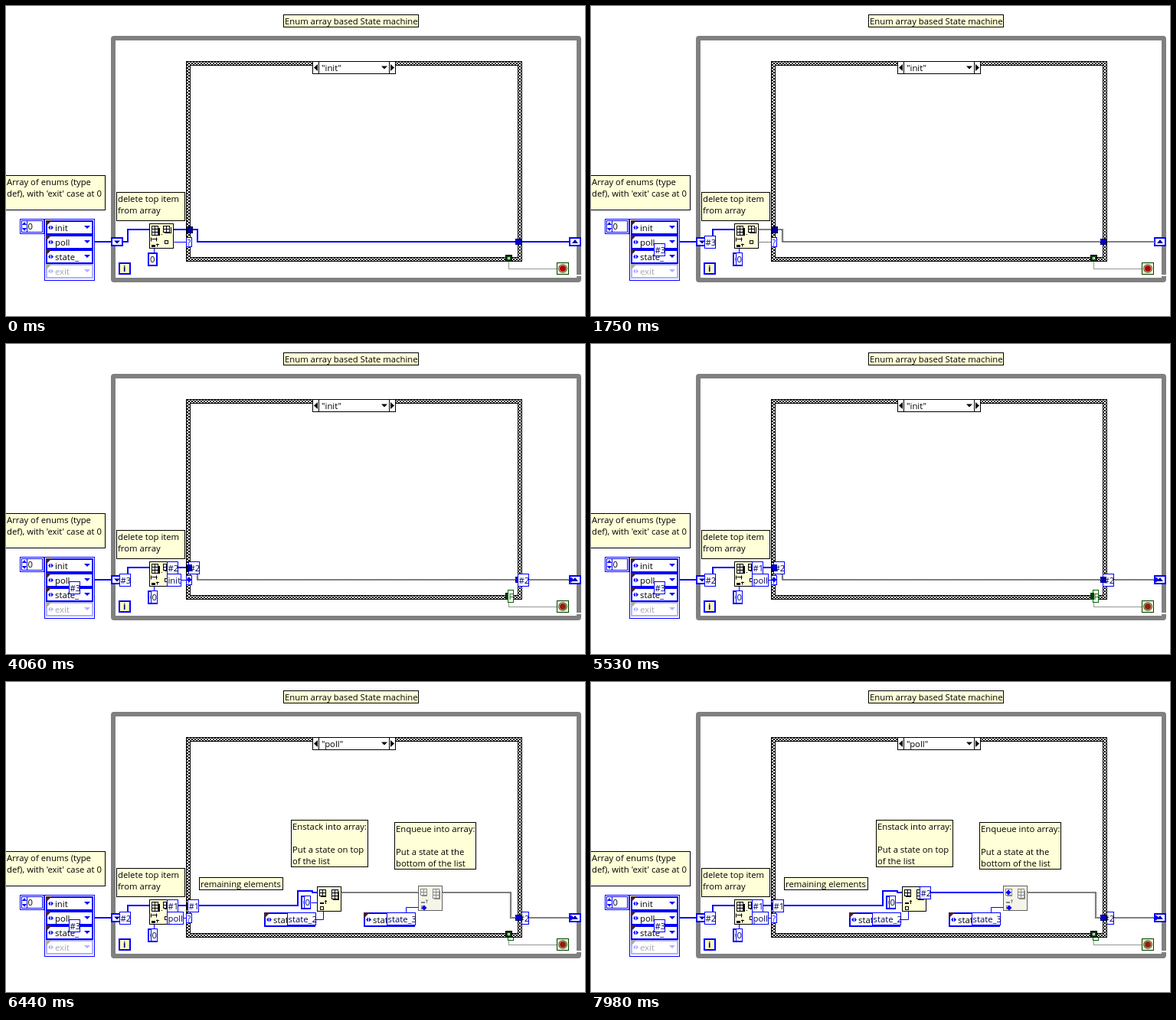
Animation, 756 px wide and 405 px high, one loop 8000 ms. Source, as an HTML page with a canvas:

```html
<!DOCTYPE html>
<html lang="en">
<head>
<meta charset="utf-8">
<title>State machine diagram</title>
<style>
html, body { margin: 0; width: 100%; height: 100%; overflow: hidden; background: #fff; }
canvas { display: block; }
</style>
</head>
<body>
<canvas id="stage" width="756" height="405"></canvas>
<script>
const c = document.getElementById('stage').getContext('2d');
const LOOP = 8000, STEP = 70;
const BLUE = '#0000ff', NAVY = '#0000a0', GREEN = '#004000', CREAM = '#ffffd8', GRAY = '#808080';
let t = 0;

function checker(size) {
  const p = document.createElement('canvas');
  p.width = p.height = size * 2;
  const g = p.getContext('2d');
  g.fillStyle = '#fff';
  g.fillRect(0, 0, size * 2, size * 2);
  g.fillStyle = '#000';
  g.fillRect(0, 0, size, size);
  g.fillRect(size, size, size, size);
  return c.createPattern(p, 'repeat');
}
const fine = checker(1), coarse = checker(2);

function rect(x, y, w, h, fill) {
  c.fillStyle = fill;
  c.fillRect(x, y, w, h);
}
function box(x, y, w, h, border, fill, b = 1) {
  rect(x, y, w, h, border);
  rect(x + b, y + b, w - 2 * b, h - 2 * b, fill);
}
function disc(x, y, r, fill) {
  c.fillStyle = fill;
  c.beginPath();
  c.arc(x, y, r, 0, 7);
  c.fill();
}
function text(s, x, y, color = '#000', style = '') {
  c.font = style + ' 11.3px "Open Sans", "Noto Sans", sans-serif';
  c.fillStyle = color;
  c.fillText(s, x, y);
}
function poly(color, ...p) {
  c.fillStyle = color;
  c.beginPath();
  for (let i = 0; i < p.length; i += 2) c.lineTo(p[i], p[i + 1]);
  c.fill();
}
const down = (x, y, color, r = 4) => poly(color, x - r, y - r / 2, x + r, y - r / 2, x, y + r / 2);

function wire(points, color, width = 1, dash = []) {
  const o = width % 2 / 2;
  c.strokeStyle = color;
  c.lineWidth = width;
  c.setLineDash(dash);
  c.beginPath();
  for (let i = 0; i < points.length; i += 2) c.lineTo(points[i] + o, points[i + 1] + o);
  c.stroke();
  c.setLineDash([]);
}
// A wire carrying data is blue, an idle one is stippled.
const link = (live, points, width = 2) => wire(points, live ? BLUE : fine, width);

function ball(x, y, color = BLUE) {
  poly(color, x - 3.5, y, x, y - 3.5, x + 3.5, y, x, y + 3.5);
}
// Moves a ball along a polyline in n equal steps, beginning at start.
function travel(start, n, p, color) {
  if (t < start) return;
  const lens = [];
  for (let i = 2; i < p.length; i += 2) lens.push(Math.hypot(p[i] - p[i - 2], p[i + 1] - p[i - 1]));
  let d = lens.reduce((a, b) => a + b) * Math.min(1, ((t - start) / STEP + 1) / n);
  let i = 0;
  while (i < lens.length - 1 && d > lens[i]) d -= lens[i++];
  const f = Math.min(1, d / lens[i]), j = i * 2;
  ball(p[j] + (p[j + 2] - p[j]) * f, p[j + 1] + (p[j + 3] - p[j + 1]) * f, color);
}
const during = (a, b) => t >= a && t < b;

function probe(s, x, y, w = 15, color = BLUE) {
  box(x, y, w, 17, color, '#fff');
  text(s, x + 1.5, y + 13, color === BLUE ? '#000060' : color);
}
function note(x, y, w, h, ...lines) {
  box(x, y, w, h, '#000', CREAM);
  lines.forEach((s, i) => text(s, x + 2, y + 13 + i * 15));
}
function zero(x, y, popped) {
  box(x, y, 13, 18, BLUE, '#fff', 2);
  text('0', x + 3, y + 13);
  if (popped) probe('0', x + 4, y, 9);
}
function enumBox(x, y, w, s, faded) {
  const color = faded ? '#b0b0ff' : BLUE;
  box(x, y, w, 19, color, '#fff', 2);
  poly(faded ? '#aaa' : '#402040', x, y, x + 8, y, x, y + 8);
  poly(color, x + 3, y + 9.5, x + 6, y + 6.5, x + 6, y + 12.5);
  poly(color, x + 10, y + 9.5, x + 7, y + 6.5, x + 7, y + 12.5);
  text(s, x + 12, y + 14, faded ? '#a8a8a8' : '#000');
  down(x + w - 8, y + 9, color);
}

function grid(x, y, cols, rows, color) {
  const w = cols * 4 + 1, h = rows * 4 + 1;
  rect(x, y, w, h, '#fff');
  for (let i = 0; i <= cols; i++) rect(x + i * 4, y, 1, h, color);
  for (let i = 0; i <= rows; i++) rect(x, y + i * 4, w, 1, color);
}
function deleteNode() {
  box(187, 284, 32, 33, '#000', CREAM);
  grid(190, 287, 2, 3, '#000');
  rect(198, 290, 3, 10, '#000');
  rect(192, 299, 8, 1, '#000');
  grid(205, 287, 2, 2, '#000');
  rect(207, 296, 9, 1, '#000');
  rect(215, 289, 1, 8, '#000');
  rect(203, 298, 1, 1, '#000');
  wire([189, 302, 189, 307], '#000');
  wire([190, 304, 197, 304], '#000');
  wire([196, 302, 196, 307], '#000');
  rect(190, 312, 5, 3, '#000');
  wire([197, 314, 197, 310], '#000');
  rect(196, 311, 4, 1, '#000');
  box(207, 306, 5, 5, '#000', CREAM);
}
function insertNode(x, y, dim) {
  const ink = dim ? '#888' : '#000';
  box(x, y, 32, 33, dim ? '#606060' : '#000', dim ? '#f4f4e8' : CREAM);
  grid(x + 3, y + 4, 2, 2, ink);
  rect(x + 5, y + 13, 7, 1, ink);
  grid(x + 19, y + 4, 2, 3, ink);
  rect(x + 21, y + 17, 8, 1, ink);
  rect(x + 28, y + 7, 1, 11, ink);
  rect(x + 4, y + 21, 5, 2, ink);
  rect(x + 11, y + 18, 1, 5, ink);
  rect(x + 10, y + 19, 3, 1, ink);
  box(x + 4, y + 26, 5, 5, ink, '#fff');
}

function loopFrame() {
  c.strokeStyle = GRAY;
  c.lineWidth = 6;
  c.beginPath();
  c.roundRect(140, 42, 608, 316, 1);
  c.stroke();
  rect(744, 351, 8, 2, '#fff');
  box(147, 335, 16, 16, BLUE, '#ffffc0', 2);
  text('i', 153, 347, '#000080', 'bold');
  box(137, 302, 16, 12, BLUE, '#fff', 2);
  down(145, 308.5, NAVY);
  box(735, 302, 16, 12, BLUE, '#fff', 2);
  poly(NAVY, 739, 310, 747, 310, 743, 305);
}

function stopButton() {
  const idle = t < 4060;
  box(719, 335, 16, 16, GREEN, '#f4f4d0');
  disc(727, 343, 5.8, '#304020');
  disc(727, 343, 4.8, idle ? '#f0e0c0' : '#d8d8a8');
  disc(727, 343, 4, idle ? '#b00000' : '#902010');
}

function inputs() {
  note(-1, 221, 131, 46, 'Array of enums (type', 'def), with \'exit\' case at 0');
  box(18, 278, 32, 20, BLUE, '#fff');
  box(20, 280, 8, 16, BLUE, '#fff');
  poly(BLUE, 21, 286, 27, 286, 24, 282);
  poly(BLUE, 21, 290, 27, 290, 24, 294);
  box(27, 280, 21, 16, BLUE, '#fff');
  text('0', 28.5, 292);
  box(50, 278, 66, 81, BLUE, '#fff');
  ['init', 'poll', 'state_', 'exit'].forEach((s, i) => enumBox(52, 280 + i * 19, 62, s, i === 3));
  wire([116, 308, 138, 308], BLUE, 2);
  if (t >= 770) probe('#3', 82, 310);
}

const leftTunnel = () => box(236, 288, 8, 9, '#000040', NAVY);
const rightTunnel = () => box(665, 304, 8, 8, '#000080', '#0000d0');
function stopTunnel() {
  box(652, 325, 9, 9, '#000', GREEN);
  box(655, 328, 3, 3, '#fff', GREEN);
}

function caseFrame(poll) {
  rect(235, 72, 439, 262, '#000');
  rect(236, 73, 437, 260, coarse);
  box(240, 77, 429, 252, '#000', '#fff');
  box(400, 72, 109, 17, '#000', '#fff');
  rect(408, 72, 1, 17, '#000');
  rect(500, 72, 1, 17, '#000');
  poly('#000', 407, 76, 407, 85, 402, 80.5);
  poly('#000', 502, 76, 502, 85, 507, 80.5);
  text(poll ? '"poll"' : '"init"', 412, 85);
  down(494, 80.5, '#000');
  box(235, 302, 8, 13, BLUE, '#fff');
  text('?', 236.5, 313, BLUE);
}

function initCase() {
  link(t < 420, [240, 292, 250, 292, 250, 308, 669, 308]);
  leftTunnel();
  rightTunnel();
  stopTunnel();
  if (t >= 2660) probe('#2', 238, 284);
  if (t >= 3640) rect(238, 288, 5, 9, NAVY);
  if (during(2660, 3640)) travel(2660, 11, [250, 308, 669, 308]);
  if (during(2100, 2660) || t >= 5250) ball(239, 292);
  if (t >= 2100) ball(239, 308);
}

function pollCase() {
  note(252, 255, 110, 17, 'remaining elements');
  note(372, 180, 101, 62, 'Enstack into array:', '', 'Put a state on top', 'of the list');
  note(507, 183, 107, 62, 'Enqueue into array:', '', 'Put a state at the', 'bottom of the list');
  link(true, [240, 292, 381, 292, 381, 273, 400, 273, 400, 275, 407, 275]);
  link(t >= 6720, [438, 275, 539, 275]);
  link(false, [570, 275, 659, 275, 659, 308, 666, 308]);
  wire([398, 288, 407, 288], BLUE);
  wire([404, 310, 414, 310, 414, 299], BLUE);
  wire([522, 302, 522, 294, 538, 294], BLUE);
  leftTunnel();
  rightTunnel();
  stopTunnel();
  probe('#1', 237, 284);
  zero(385, 279, true);
  enumBox(337, 301, 67, 'state_2');
  probe('state_2', 367, 301, 38);
  enumBox(467, 301, 67, 'state_3');
  probe('state_3', 497, 301, 38);
  insertNode(406, 267, false);
  insertNode(538, 266, !(during(7140, 7420) || during(7700, 7980)));
  ball(546, 295);
  if (t < 6440) {
    travel(5810, 6, [252, 292, 381, 292, 381, 273, 413, 275]);
    ball(413, 288);
    ball(414, 295);
  }
  if (t >= 6720) {
    probe('#2', 429, 267);
    travel(6720, 3, [444, 275, 545, 275]);
  }
}

function nodeLabels(size, name) {
  probe(size, 210, 284);
  probe(name, 210, 300, name === 'poll' ? 22 : 19);
}

function draw() {
  const idle = t < 420, poll = t >= 5810;
  rect(0, 0, 756, 405, '#fff');
  note(362, 11, 177, 17, 'Enum array based State machine');
  loopFrame();
  inputs();
  note(144, 243, 90, 38, 'delete top item', 'from array');

  link(idle || t >= 1400, [153, 308, 159, 308, 159, 292, 188, 292]);
  link(idle || t >= 2100, [219, 292, 238, 292]);
  link(idle || t >= 2100, [219, 308, 236, 308], 1);
  link(idle, [673, 308, 736, 308]);
  link(idle || t >= 1400, [193, 316, 193, 323], 1);
  wire([656, 334, 656, 343, 719, 343], '#203020', 1, [1, 1]);
  stopButton();

  const outLabels = () => {
    probe('#2', 668, 300);
    probe('F', 655, 321, 8, '#006000');
  };
  if (poll) outLabels();
  caseFrame(poll);
  (poll ? pollCase : initCase)();
  if (during(3920, 5810)) {
    outLabels();
    if (t >= 5530) {
      rect(665, 304, 8, 8, NAVY);
      rect(652, 325, 5, 9, GREEN);
    }
  }
  if (t >= 3920) {
    travel(3920, 3, [683, 308, 738, 308]);
    if (t < 4060) travel(3920, 3, [664, 343, 722, 343], '#006000');
  }

  if (during(4970, 5250)) nodeLabels('#2', 'init');
  deleteNode();
  zero(185, 322, t >= 1400);
  if (during(2100, 4970)) nodeLabels('#2', 'init');
  if (t >= 5250) nodeLabels('#1', 'poll');

  if (during(770, 1400)) travel(770, 3, [116, 308, 148, 308]);
  if (t >= 1400) probe(t < 4620 ? '#3' : '#2', 148, 300);
  if (during(1400, 1750)) travel(1400, 3, [159, 300, 159, 292, 195, 292]);
  if (during(4620, 4970)) travel(4620, 2, [159, 300, 159, 292, 195, 292]);
  if (during(1400, 1750) || during(4620, 4970)) ball(195, 312);
}

function tick() {
  t = Math.floor(performance.now() % LOOP / STEP) * STEP;
  draw();
  requestAnimationFrame(tick);
}
tick();
</script>
</body>
</html>
```
